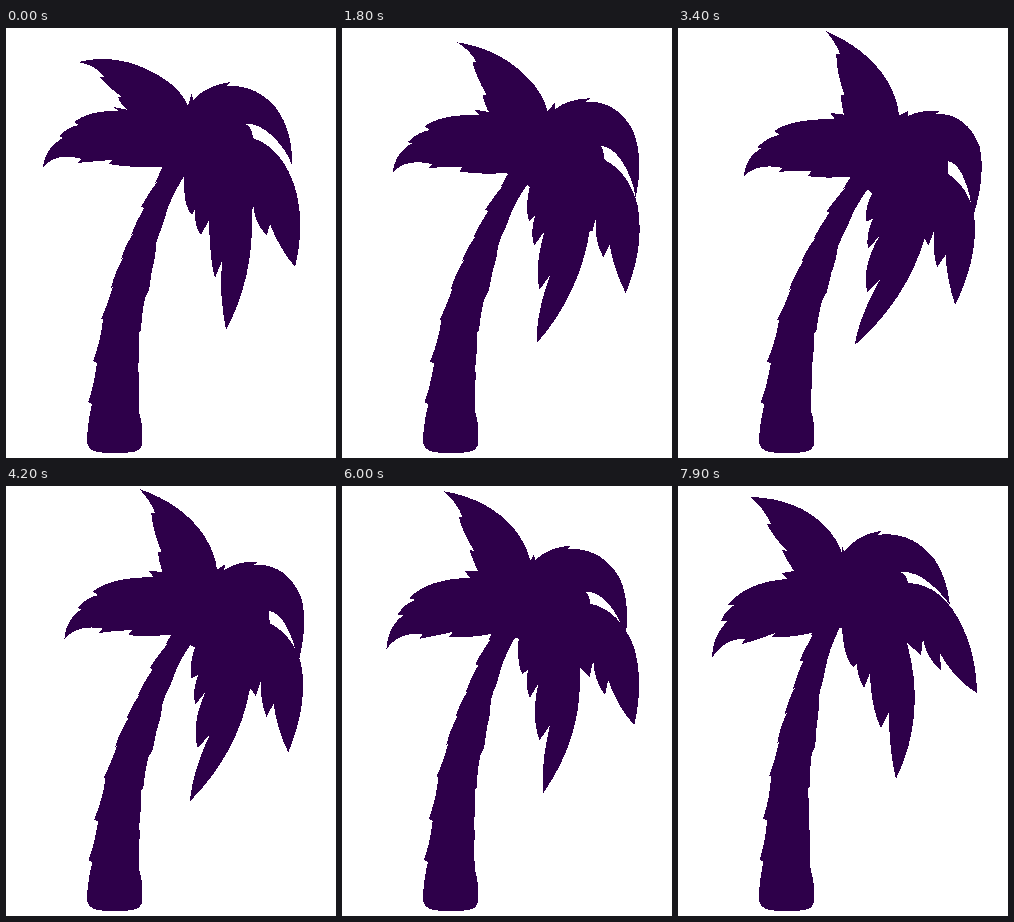
An HTML page for the animation above (8000 ms loop, 330 px wide and 430 px high).

```html
<!DOCTYPE html>
<html>
<head>
<meta charset="utf-8">
<style>
html, body { margin: 0; width: 100%; height: 100%; overflow: hidden; background: #fff; }
svg { display: block; width: 330px; height: 430px; }
path { fill: #2e004a; shape-rendering: crispEdges; }
</style>
</head>
<body>
<svg viewBox="0 0 330 430"><path id="trunk"/><path id="crown"/></svg>
<script>
const LOOP = 8000, STEP = 100, TURN = 3200, RIGHT = 2700, LEFT = 7900;

// Each frond's outline, in order round the crown: at the start, swayed right, swayed left.
const fronds = [
  [ // upper left
    'M122 82 Q115 78 112 69 L116 69 Q103 60 94 49 L98 49 Q90 37 72 34 Q112 24 150 46 Q174 59 182 78',
    'M161 86 Q158 77 157 67 L161 68 Q152 46 151 29 L155 30 Q150 18 139 8 Q180 22 202 52 Q215 70 217 87',
    'M116 85 Q109 75 104 64 L109 65 Q96 52 89 38 L93 38 Q86 22 72 11 Q119 12 147 40 Q160 54 164 67'
  ],
  [ // upper right
    'L186 64 L187 73 Q198 58 225 54 L220 58 Q250 56 270 80 Q287 103 286 137 Q280 120 264 106 Q252 95 239 96 Q246 98 247 110',
    'L226 81 L225 87 Q238 79 258 80 L254 83 Q284 82 298 114 Q306 142 294 184 Q292 160 282 142 Q275 130 267 129 Q267 135 268 142',
    'L164 59 L166 66 Q180 48 203 45 L199 49 Q234 44 257 74 Q269 92 272 119 Q262 105 250 96 Q237 85 222 86 Q229 89 230 97'
  ],
  [ // lower right
    'Q278 121 290 163 Q299 198 289 239 Q273 220 264 196 L261 207 Q247 195 247 170',
    'Q289 156 295 183 Q301 224 278 273 Q269 249 267 224 L259 236 Q253 219 255 199',
    'Q265 98 285 142 Q298 170 299 207 Q276 193 262 167 L263 184 Q248 172 245 152'
  ],
  [ // hanging
    'L247 178 L246 185 Q248 250 220 302 Q213 268 216 233 L209 250 Q204 235 203 192 L195 207 Q188 198 189 181 L186 187 Q177 178 178 147',
    'L250 213 L247 208 Q231 269 182 315 Q185 286 204 249 L192 262 Q186 240 202 206 L191 219 Q188 205 195 189 L188 193 Q186 180 193 163',
    'L243 169 L229 157 Q249 229 218 293 Q211 265 211 226 L203 242 Q193 222 192 187 L186 202 Q179 191 179 177 L175 181 Q166 172 164 142'
  ],
  [ // left
    'L155 139 Q125 140 103 136 L106 132 Q90 133 71 135 L76 131 Q50 124 37 139 Q40 119 57 110 L53 108 Q62 99 73 97 L68 94 Q84 82 113 83 L107 79 L122 82 Z',
    'L170 147 Q145 149 127 146 L131 141 Q115 140 98 142 L102 138 Q76 132 63 146 Q65 127 81 118 L77 117 Q87 107 99 105 L94 101 Q111 89 152 90 L147 84 L161 86 Z',
    'L137 146 Q115 152 94 151 L97 147 Q80 154 64 158 L67 153 Q47 152 34 172 Q35 148 50 135 L43 135 Q48 123 57 119 L50 119 Q68 96 109 93 L104 87 L116 85 Z'
  ]
];

const trunk = 'M157 128 L181 144 Q171 158 163 177 L160 186 Q156 200 153 206 L150 216 Q150 228 146 242 ' +
  'L143 262 L139 270 Q136 284 135 302 L133 304 Q134 320 132 342 L133 345 Q132 370 133 384 ' +
  'Q137 396 136 412 Q137 423 126 424 Q110 427 92 424 Q80 422 81 410 Q82 392 86 376 L82 374 ' +
  'Q87 362 91 335 L87 333 Q95 312 97 291 L95 291 Q102 276 107 258 L105 260 Q109 244 117 230 ' +
  'L115 231 Q119 218 127 206 L125 207 Q130 194 138 180 L135 179 Q141 168 151 154 L149 155 L157 138 Z';

const lerp = (a, b, p) => a + (b - a) * p;
const numbers = path => path.match(/\d+/g).map(Number);
const crown = fronds.map(poses => ({ path: poses[0], poses: poses.map(numbers) }));

// Steady swing to the right until TURN, then steadily back to the left.
function sway(start, right, left, t) {
  const now = lerp(start, right, Math.min(t, TURN) / RIGHT);
  return t < TURN ? now : lerp(now, left, (t - TURN) / (LEFT - TURN));
}

// Straight paths between poses cut across the swing; stretching from the heart restores the arc.
function stretch(t) {
  const p = t < TURN ? t / TURN : (t - TURN) / (LEFT - TURN);
  return 1 + 0.1 * p * (1 - p);
}

function frondPath({ path, poses: [start, right, left] }, t) {
  const heart = [sway(185, 203, 168, t), 115], scale = stretch(t);
  let i = 0;
  return path.replace(/\d+/g, () => {
    const n = sway(start[i], right[i], left[i], t);
    return lerp(heart[i++ % 2], n, scale).toFixed(2);
  });
}

// The trunk bends more the higher the point lies above its foot.
function trunkPath(t) {
  const lean = sway(0, 16, -17, t);
  return trunk.replace(/(\d+) (\d+)/g, (_, x, y) => {
    const bend = lean * ((425 - y) / 280) ** 2;
    return (+x + bend).toFixed(2) + ' ' + (+y + bend * 0.35).toFixed(2);
  });
}

const trunkEl = document.getElementById('trunk');
const crownEl = document.getElementById('crown');

function draw() {
  const t = Math.floor(performance.now() % LOOP / STEP) * STEP;
  trunkEl.setAttribute('d', trunkPath(t));
  crownEl.setAttribute('d', crown.map(frond => frondPath(frond, t)).join(' '));
  requestAnimationFrame(draw);
}
draw();
</script>
</body>
</html>
```
